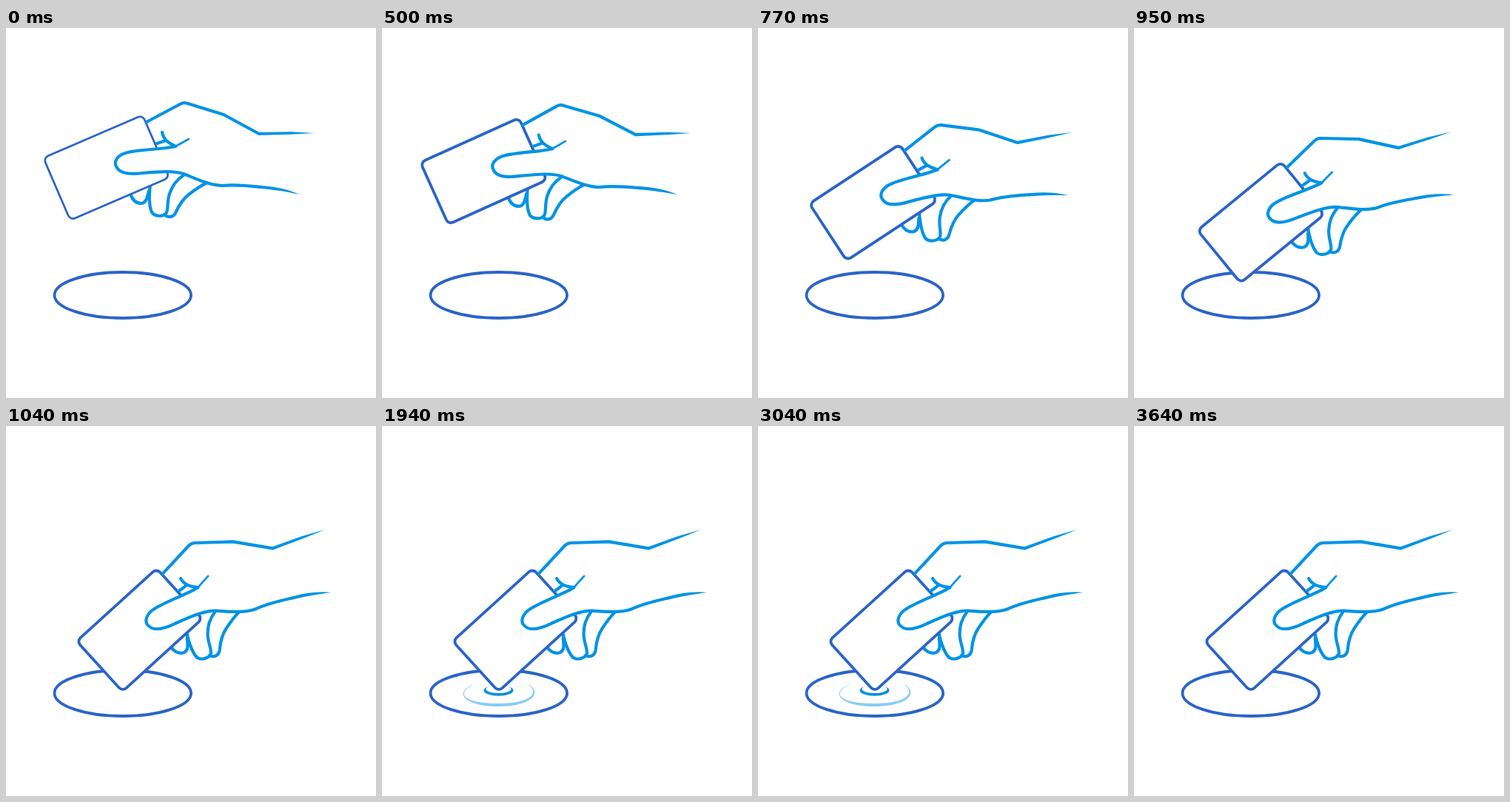
Recreate the animation shown at these times as an HTML page. Size 500 by 500 pixels, loop 3740 ms.

```html
<!DOCTYPE html>
<html lang="en">
<head>
<meta charset="utf-8">
<title>Tap card</title>
<style>
  html, body { margin: 0; height: 100%; overflow: hidden; background: #fff; }
  svg { display: block; width: 100%; height: 100%; }
  .navy { fill: #fff; stroke: #2b64c8; }
  .line { fill: none; stroke: #0093e5; stroke-width: 4.2; stroke-linecap: round; stroke-linejoin: round; }
  .tip { fill: #0093e5; }
</style>
</head>
<body>
<svg viewBox="0 0 500 500">
  <ellipse class="navy" cx="157.8" cy="361" rx="92.3" ry="31" stroke-width="3.8"/>
  <g id="ripple">
    <path fill="#88cdf3" d="M126 348C94 360 112 379 157 379C203 379 219 360 196 348C215 361 200 375 157 375C109 375 98 361 126 348Z"/>
    <path fill="#0a8fdc" fill-rule="evenodd" d="M137.500 357.200a20 7.500 0 0 0 40 0a20 7.500 0 0 0 -40 0ZM140.500 355.500a17 5.500 0 0 0 34 0a17 5.500 0 0 0 -34 0Z"/>
  </g>
  <g id="arm">
    <g class="line">
      <path d="M168 224C171 233 176 237 183 237C190 236 191 228 193 220"/>
      <path d="M195 211C193 228 193 240 197 249C201 255 212 255 216 251C220 246 217 236 221 224C225 212 232 204 240 199"/>
      <path d="M214 252C219 257 226 256 229 250C234 239 239 231 247 225C256 218 263 213 272 209"/>
    </g>
    <rect id="card" class="navy" x="-73" y="-45.9" width="146" height="91.8" rx="7" transform="translate(135.7 188.7) rotate(-23.3)"/>
    <g class="line">
      <path fill="#fff" d="M229 160C212 164 181 164 165 168C151 171 145 180 149 187C153 197 169 198 185 196C207 194 231 192 245 199C262 206 278 213 292 213C310 211 327 213 345 215"/>
      <path d="M190 127L236 102.500Q240 100.500 244 101.500L294 117L342 143"/>
      <path d="M204 156L216 152M211 141C213 151 219 155 229 160"/>
      <path style="stroke-width:2.800" d="M229 160L247 150"/>
    </g>
    <path class="tip" d="M342 140.900L385 140.300L417 142L385 143.800L342 145.100Z"/>
    <path class="tip" d="M345 212.900C365 214.500 382 218 397 225C380 221.500 365 219 345 217.100Z"/>
  </g>
</svg>
<script>
const LOOP = 3740, STEPS = 19;
const [arm, card, ripple] = ["arm", "card", "ripple"].map(id => document.getElementById(id));
const clamp = (v, lo, hi) => Math.min(hi, Math.max(lo, v));

// The wrist drifts slightly while the hand swings down around it.
function swing(t) {
  const step = clamp(Math.floor((t - 500) / 30) + 1, 0, STEPS), s = step / STEPS;
  arm.setAttribute("transform",
    `translate(${415 + 14.3 * s} ${142 - 1.4 * s}) rotate(${-19 * s}) translate(-415 -142)`);
  card.setAttribute("stroke-width", step ? 3.8 : 2.7);
}

// Two pulses of eleven steps each: fade in, then out.
function pulse(t) {
  const p = Math.floor((t - 1540) / 100) % 11;
  const alpha = t < 1540 ? 0 : p <= 4 ? (p + 1) / 5 : (10 - p) / 6;
  ripple.setAttribute("opacity", alpha);
}

const start = performance.now();
function draw(now) {
  const t = Math.max(0, now - start) % LOOP;
  swing(t);
  pulse(t);
  requestAnimationFrame(draw);
}
draw(start);
</script>
</body>
</html>
```
